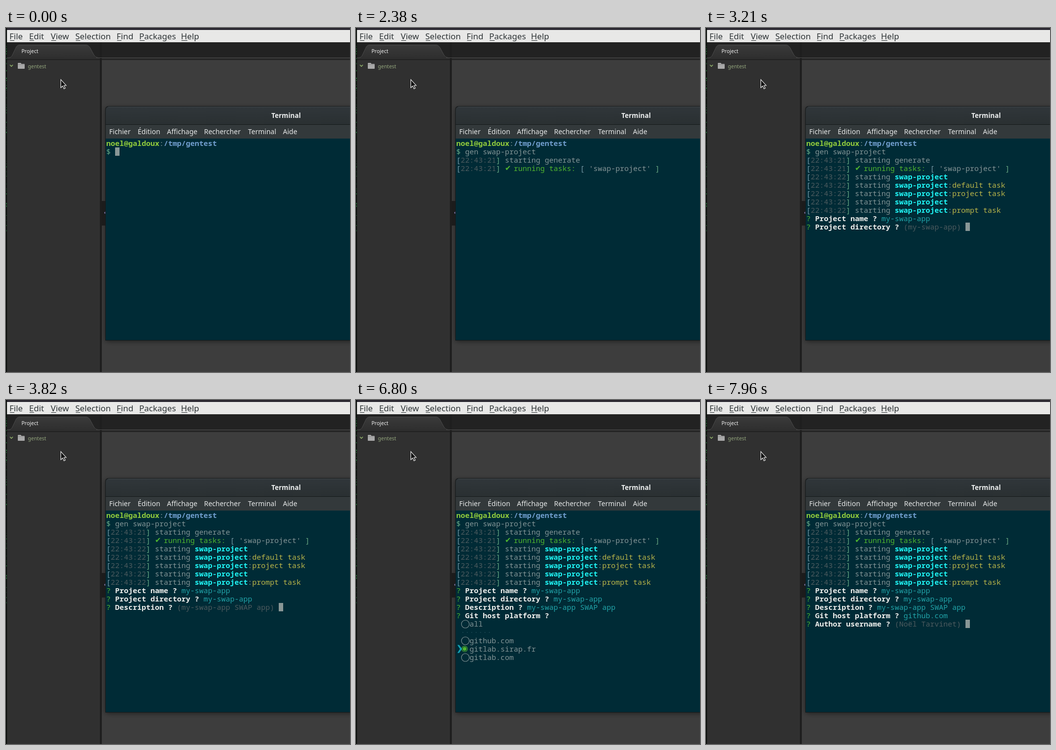
An HTML page that plays this animation: 700 by 700 pixels, repeating every 8000 ms.

```html
<!DOCTYPE html>
<html lang="en">
<head>
<meta charset="utf-8">
<title>Project generator</title>
<style>
  html, body { margin: 0; width: 100%; height: 100%; overflow: hidden; background: #3d3d3d; }
  #stage { position: relative; width: 700px; height: 700px; overflow: hidden; }
  svg { position: absolute; left: 0; top: 0; }
  .ui text { font-family: "Noto Sans", "Open Sans", sans-serif; }
  .menu { font-size: 17px; fill: #2e3436; }
  .side { font-size: 10.5px; }
  .bar { font-size: 14px; fill: #e6e8e8; }
  .item { position: absolute; height: 17px; line-height: 17px; white-space: pre;
    font-family: "Noto Sans Mono", "DejaVu Sans Mono", monospace; font-size: 15px; color: #839496; }
  .item svg { overflow: visible; }
  .caret { width: 9px; background: #899796; }
  b { font-weight: 700; }
  .user { color: #92cc3c; } .path { color: #729fcf; }
  .dim { color: #4c5a5e; } .faint { color: #1d4955; }
  .ok { color: #4fb52f; } .ans { color: #21a3a8; }
  .task { color: #1ff4f4; } .kind { color: #b9b54a; } .ask { color: #eeeeec; }
  .lb { color: #7699a6; } .rb { color: #66a883; }
  .tick { font-family: "DejaVu Sans", sans-serif; font-size: 15px; }
</style>
</head>
<body>
<div id="stage">
  <svg class="ui" width="700" height="700">
    <defs>
      <linearGradient id="tab" x1="0" y1="0" x2="0" y2="1">
        <stop offset="0" stop-color="#3a3a3a"/><stop offset="1" stop-color="#2e2e2e"/>
      </linearGradient>
      <linearGradient id="head" x1="0" y1="0" x2="0" y2="1">
        <stop offset="0" stop-color="#30363a"/><stop offset="1" stop-color="#2a3032"/>
      </linearGradient>
      <filter id="blur" x="-10%" y="-10%" width="120%" height="120%"><feGaussianBlur stdDeviation="5"/></filter>
    </defs>
    <rect width="700" height="700" fill="#3d3d3d"/>
    <rect y="29" width="700" height="32" fill="#222"/>
    <rect y="61" width="700" height="3" fill="#2c2c2c"/>
    <rect y="60" width="700" height="1" fill="#4a4a4a"/>
    <rect y="64" width="700" height="1" fill="#171717"/>
    <rect y="65" width="191" height="635" fill="#303030"/>
    <rect x="191" y="29" width="4" height="671" fill="#1e1e1e"/>
    <rect x="191" y="60" width="4" height="1" fill="#4a4a4a"/>
    <path d="M2 61.5H6Q11 60 13 55L20 40Q22 35 27 34.5H164Q168 35 171 40L179 55Q182 61 187 61.5Z" fill="url(#tab)"/>
    <path d="M2 60.5H6Q11 60 13 55L20 40Q22 35 27 34.5H164Q168 35 171 40L179 55Q182 60 187 60.5" fill="none" stroke="#4a4a4a"/>
    <rect y="0" width="700" height="4" fill="#2a2730"/>
    <rect y="4" width="700" height="25" fill="#e8e8e7"/>
    <g id="menu" class="menu"></g>
    <g class="side">
      <text x="31.5" y="51" fill="#f0f0f0">Project</text>
      <text x="44.5" y="82" fill="#93a57c">gentest</text>
    </g>
    <path d="M8 75L11 78L14 75" fill="none" stroke="#8fae6a" stroke-width="1.6"/>
    <path d="M24 72Q24 71 25 71H30L31.5 73H37Q38 73 38 74V82Q38 83 37 83H25Q24 83 24 82Z" fill="#a9a9a9"/>
    <path d="M24 74.5H38" stroke="#777" stroke-width=".6"/>
    <path d="M111.5 105V121.5L115.3 118L118 123.8L120.6 122.6L118 117H122.5Z" fill="#111" stroke="#f4f4f4" stroke-width="1.1"/>
    <rect width="2" height="700" fill="#070b08"/>
    <g id="flecks" fill="#1f7a35"></g>
    <rect x="195" y="352" width="12" height="50" fill="#1f1f1f"/>
    <rect x="202" y="162" width="520" height="476" rx="6" fill="#000" opacity=".45" filter="url(#blur)"/>
    <rect x="195" y="352" width="8" height="50" fill="#1c1c1c"/>
    <path d="M202.5 374L200.5 376L202.5 378" fill="none" stroke="#8f86c0" stroke-width="1.2"/>
    <path d="M202 636V166Q202 159 209 159H700V636Z" fill="#15191a"/>
    <path d="M203 196V167Q203 160 210 160H700V196Z" fill="url(#head)"/>
    <path d="M208 160.5H700" stroke="#434a4d"/>
    <rect x="203" y="197" width="497" height="28" fill="#33393b"/>
    <rect x="203" y="225" width="497" height="410" fill="#002b36"/>
    <text x="540" y="183" font-size="13.6" font-weight="700" fill="#eceeee">Terminal</text>
    <g id="bar" class="bar"></g>
  </svg>
</div>
<script>
const LOOP = 8000;
const stage = document.getElementById('stage');
const items = [];

// Window chrome
const words = (id, y, list) => document.getElementById(id).innerHTML =
  list.map(([x, s]) => `<text x="${x}" y="${y}">${s}</text>`).join('');
const menu = [[7, 'File', 9], [47, 'Edit', 9], [91, 'View', 10], [141, 'Selection', 9],
  [225, 'Find', 9], [271, 'Packages', 10], [356, 'Help', 12]];
words('menu', 23, menu);
document.getElementById('menu').innerHTML +=
  menu.map(([x, , w]) => `<rect x="${x + 1}" y="25" width="${w}" height="1"/>`).join('');
words('bar', 216, [[210, 'Fichier'], [268, 'Édition'], [327.5, 'Affichage'],
  [403, 'Rechercher'], [492.5, 'Terminal'], [563.5, 'Aide']]);

let seed = 7;
const rand = () => (seed = seed * 16807 % 2147483647) / 2147483647;
let flecks = '';
for (let y = 36; y < 416; y += 5)
  if (rand() < .6) flecks += `<rect x="0" y="${y}" width="1.5" height="${1 + Math.floor(rand() * 3)}" opacity="${rand().toFixed(2)}"/>`;
document.getElementById('flecks').innerHTML = flecks;

// Terminal cells: visible from `from` until `to`
function put(from, to, row, col, html, cls = '') {
  const el = document.createElement('div');
  el.className = 'item ' + cls;
  el.style.left = 204 + col * 9 + 'px';
  el.style.top = 226 + row * 17 + 'px';
  el.innerHTML = html;
  stage.append(el);
  items.push({ el, from, to });
}
const tag = (cls, s) => `<span class="${cls}">${s}</span>`;
const bold = (cls, s) => `<b class="${cls}">${s}</b>`;
const stamp = s => tag('lb', '[') + tag('dim', '22:43:' + s) + tag('rb', ']') + ' ';
const start = kind => stamp(22) + 'starting ' + bold('task', 'swap-project') +
  (kind ? ':' + tag('kind', kind + ' task') : '');
const ask = s => tag('ok', '?') + ' ' + bold('ask', s + ' ?') + ' ';
const caret = (from, to, row, col) => put(from, to, row, col, '', 'caret');

function question(row, text, hint, answer, from, done) {
  put(from, done, row, 0, ask(text) + hint);
  if (done < LOOP) put(done, LOOP, row, 0, ask(text) + tag('ans', answer));
}

put(0, LOOP, 0, 0, bold('user', 'noel@galdoux') + ':' + bold('path', '/tmp/gentest'));
put(0, LOOP, 1, 0, tag('rb', '$'));
put(420, LOOP, 1, 2, 'gen swap-project');
put(2030, LOOP, 2, 0, stamp(21) + 'starting generate');
put(2380, LOOP, 3, 0, stamp(21));
put(2380, LOOP, 3, 11, '✔', 'ok tick');
put(2380, LOOP, 3, 13, tag('ok', 'running tasks:') + ' ' + tag('lb', '[') + " 'swap-project' " + tag('rb', ']'));
['', 'default', 'project', '', 'prompt'].forEach((kind, i) => put(2680, LOOP, 4 + i, 0, start(kind)));

question(9, 'Project name', tag('dim', '(my-swap-app)'), 'my-swap-app', 2730, 3170);
question(10, 'Project directory', tag('dim', '(my-swap-app)'), 'my-swap-app', 3210, 3780);
question(11, 'Description', tag('dim', '(my-swap-app SWAP app)'), 'my-swap-app SWAP app', 3820, 4410);
put(4410, 5410, 12, 22, '(Press &lt;space&gt; to select)');
question(12, 'Git host platform', '', 'github.com', 4410, 7960);
question(13, 'Author username', tag('dim', '(Noël Tarvinet)'), '', 7960, LOOP);

// Checkbox list
const svg = s => `<svg width="30" height="17" fill="none">${s}</svg>`;
const OFF = svg('<circle cx="9.5" cy="9" r="8" stroke="#839496" stroke-width="1.1"/>');
const ON = svg('<circle cx="8" cy="8.5" r="5.7" stroke="#4fb52f" stroke-width="1.1"/><circle cx="8" cy="8.5" r="3.9" fill="#4fb52f"/>');
const ARROW = svg('<path d="M2.3 .5H6L11.7 8.5L6 16.7H2.3L7.6 8.5Z" fill="#12a0b4"/>');
const END = 7960;
[[13, 'all'], [15, 'github.com'], [16, 'gitlab.sirap.fr'], [17, 'gitlab.com']]
  .forEach(([row, name]) => put(4410, END, row, 3, name));
put(4410, END, 14, 1, '·······', 'faint');

function toggles(row, on, ...times) {
  [4410, ...times].forEach((t, i) => {
    put(t, times[i] ?? END, row, 1, on ? ON : OFF);
    on = !on;
  });
}
toggles(13, false);
toggles(15, true, 6390, 7330);
toggles(16, false, 5900, 6890);
toggles(17, false);

const moves = [[4410, 13], [5410, 15], [5570, 16], [6240, 15], [6800, 16], [7160, 15], [END]];
moves.slice(0, -1).forEach(([t, row], i) => put(t, moves[i + 1][0], row, 0, ARROW));

caret(0, 170, 1, 2);
caret(420, 990, 1, 18);
caret(1590, 1760, 1, 18);
caret(1760, 2030, 2, 0);
caret(2030, 2330, 3, 0);
caret(2930, 3170, 9, 31);
caret(3170, 3210, 10, 0);
caret(3210, 3730, 10, 36);
caret(3820, 4410, 11, 39);
caret(7960, LOOP, 13, 36);

function draw(t) {
  for (const { el, from, to } of items)
    el.style.visibility = t >= from && t < to ? 'visible' : 'hidden';
}
let t0;
function tick(now) {
  t0 ??= now;
  draw((now - t0) % LOOP);
  requestAnimationFrame(tick);
}
draw(0);
requestAnimationFrame(tick);
</script>
</body>
</html>
```
